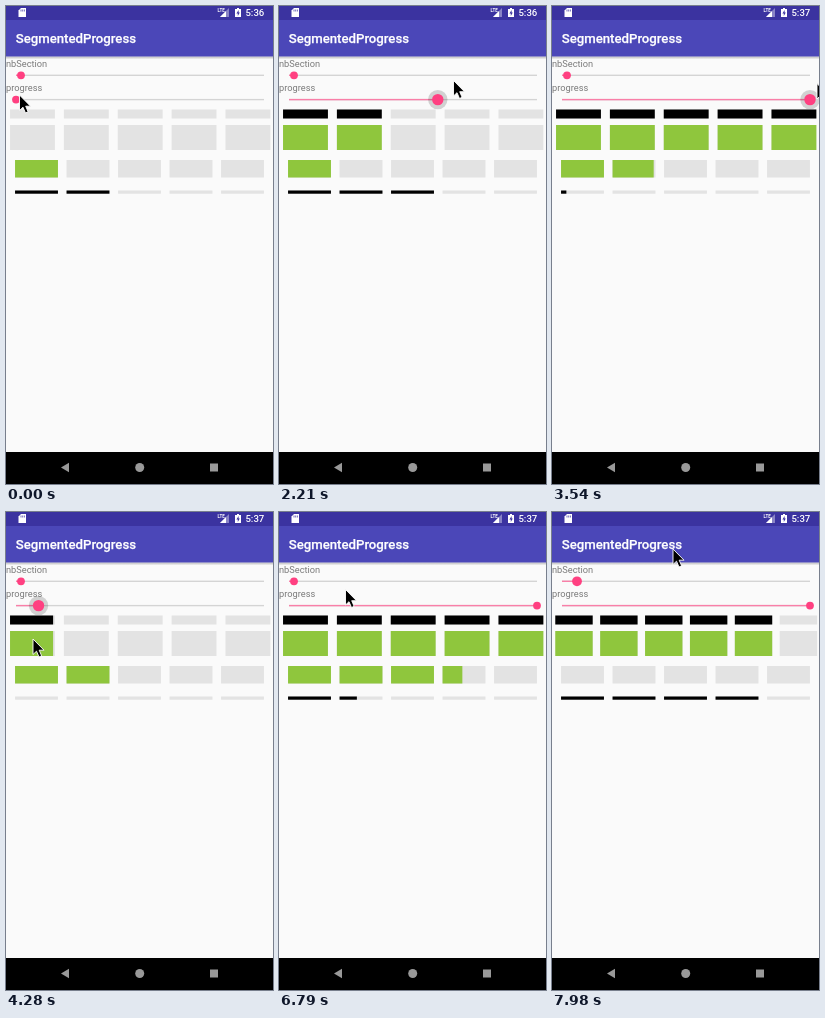
Write an HTML page that moves like this. It is 267 px wide and 478 px high and loops after 8000 ms.

```html
<!DOCTYPE html>
<html lang="en">
<head>
<meta charset="utf-8">
<title>SegmentedProgress</title>
<style>
  html, body { margin: 0; width: 100%; height: 100%; overflow: hidden; background: #fafafa; }
  svg { display: block; width: 100vw; height: 100vh; font-family: Roboto, sans-serif; }
</style>
</head>
<body>
<svg viewBox="0 0 267 478">
  <defs>
    <linearGradient id="shade" x2="0" y2="1">
      <stop stop-color="#000" stop-opacity=".25"/>
      <stop offset="1" stop-color="#000" stop-opacity="0"/>
    </linearGradient>
  </defs>
  <rect width="267" height="478" fill="#fafafa"/>
  <rect y="50.5" width="267" height="3" fill="url(#shade)"/>
  <rect width="267" height="50.5" fill="#4b47b8"/>
  <rect width="267" height="14" fill="#3b33a0"/>
  <g fill="#fff">
    <path d="M15 2h5v9h-7.5v-6.5z"/>
    <path d="M15 3.5v2M16.7 3.5v2M18.4 3.5v2" stroke="#3b33a0" stroke-width=".7"/>
    <path d="M214 11l9-9v9z" opacity=".4"/>
    <path d="M214 11l6-6v6z"/>
    <text x="211.5" y="6" font-size="4.5" font-weight="700">LTE</text>
    <path d="M231 2h2v1h2v8h-6v-8h2z"/>
    <path d="M232.6 4l-2.2 3.5h1.4v2.5l2-3.5h-1.2z" fill="#3b33a0"/>
    <text id="clock" x="258.3" y="10.3" font-size="9.6" font-weight="500" text-anchor="end"></text>
    <text x="9.7" y="37.3" font-size="13.2" font-weight="500" stroke="#fff" stroke-width=".25">SegmentedProgress</text>
  </g>
  <g fill="#7b7b7b" font-size="9.25">
    <text x="0" y="61">nbSection</text>
    <text x="0" y="85">progress</text>
  </g>
  <rect y="446" width="267" height="32"/>
  <g fill="#999">
    <path d="M55 461.5l8-4.7v9.4z"/>
    <circle cx="133.7" cy="461.5" r="4.5"/>
    <rect x="204" y="457.5" width="8" height="8"/>
  </g>
  <g id="live"></g>
</svg>
<script>
const LOOP = 8000, STEP = 147.8;
const GREY = '#e3e3e3', GREEN = '#8fc63d', PINK = '#ff4081';
const live = document.getElementById('live'), clock = document.getElementById('clock');

const clamp = x => Math.min(1, Math.max(0, x));
const move = (k, start, end) => clamp((k - start) / (end - start));
const ease = (k, start, end) => (1 - Math.cos(Math.PI * move(k, start, end))) / 2;

const rect = (x, y, w, h, fill) =>
  `<rect x="${x}" y="${y}" width="${w}" height="${h}" fill="${fill}"/>`;

function segments(n, total, centre, y, h, value, fill) {
  const pitch = total / n, w = pitch * 5 / 6;
  let out = '';
  for (let i = 0; i < n; i++) {
    const x = centre - total / 2 + pitch * (i + 1 / 12);
    const part = clamp(value - i);
    out += rect(x, y, w, h, GREY);
    if (part > 0.005) out += rect(x, y, w * part, h, fill);
  }
  return out;
}

function slider(x, y, r, halo) {
  return rect(10, y - .7, 248, 1.4, '#d4d4d4') + rect(10, y - .7, x - 10, 1.4, '#f97fa8') +
    (halo ? `<circle cx="${x}" cy="${y}" r="9.7" fill="#000" opacity=".16"/>` : '') +
    `<circle cx="${x}" cy="${y}" r="${r}" fill="${PINK}"/>`;
}

// Pointer stops: step, x, y
const stops = [[1, 13.5, 89], [15, 174.5, 74.5], [19, 207, 76], [24, 265, 77.5], [29, 27, 127],
  [32, 4, 130], [36, 272, 95], [41, 272, 95], [46, 66.5, 77.5], [49, 15, 66], [51, 17, 67], [54, 121, 37]];

function pointer(k) {
  let [, x, y] = stops[0];
  for (let i = 1; i < stops.length; i++) {
    const [from, x0, y0] = stops[i - 1], [to, x1, y1] = stops[i];
    const part = move(k, from, to);
    x += (x1 - x0) * part;
    y += (y1 - y0) * part;
  }
  return `<path transform="translate(${x} ${y})" stroke="#fff" stroke-width=".9"
    d="M0 0V15.5L3.5 12.2L6 18L8.6 16.8L6.2 11.2H11Z"/>`;
}

function draw(k) {
  const sections = k < 51 ? 5 : 6;
  const held = k > 1 && k < 38;
  const progress = .6 * move(k, 1, 15) + .2 * move(k, 15, 17) + .2 * move(k, 19, 23)
    - move(k, 25, 29.4) + move(k, 32, 36);
  const fill = 2 * move(k, 5, 14) + 2 * move(k, 15, 18) + move(k, 20, 23)
    - 5 * move(k, 25, 29.95) + 5 * move(k, 32, 37);

  // Both lower rows head for new values together
  const second = ease(k, 20, 24.6), third = ease(k, 32, 36), fourth = ease(k, 44.9, 49.5);
  const upper = 1 + second + 2 * third - 4 * fourth;
  const lower = 2 + ease(k, 4.4, 9) - 3 * second + third + 3 * fourth;

  clock.textContent = k < 18 ? '5:36' : '5:37';
  live.innerHTML =
    slider(15 + 10 * move(k, 50, 51), 69.3, k < 50 ? 3.9 : 4.9, false) +
    slider(10 + 248 * progress, 93.6, held ? 5.7 : 3.9, held) +
    segments(sections, 269.3, 134.2, 103.5, 9, fill, '#000') +
    segments(sections, 269.3, 134.2, 119, 25, fill, GREEN) +
    segments(5, 257.5, 133.5, 154, 17.5, upper, GREEN) +
    segments(5, 257.5, 133.5, 184.5, 3.2, lower, '#000') +
    pointer(k);
}

let shown = -1;
function tick() {
  const k = Math.floor((performance.now() % LOOP + 14) / STEP);
  if (k !== shown) draw(shown = k);
  requestAnimationFrame(tick);
}
tick();
</script>
</body>
</html>
```
